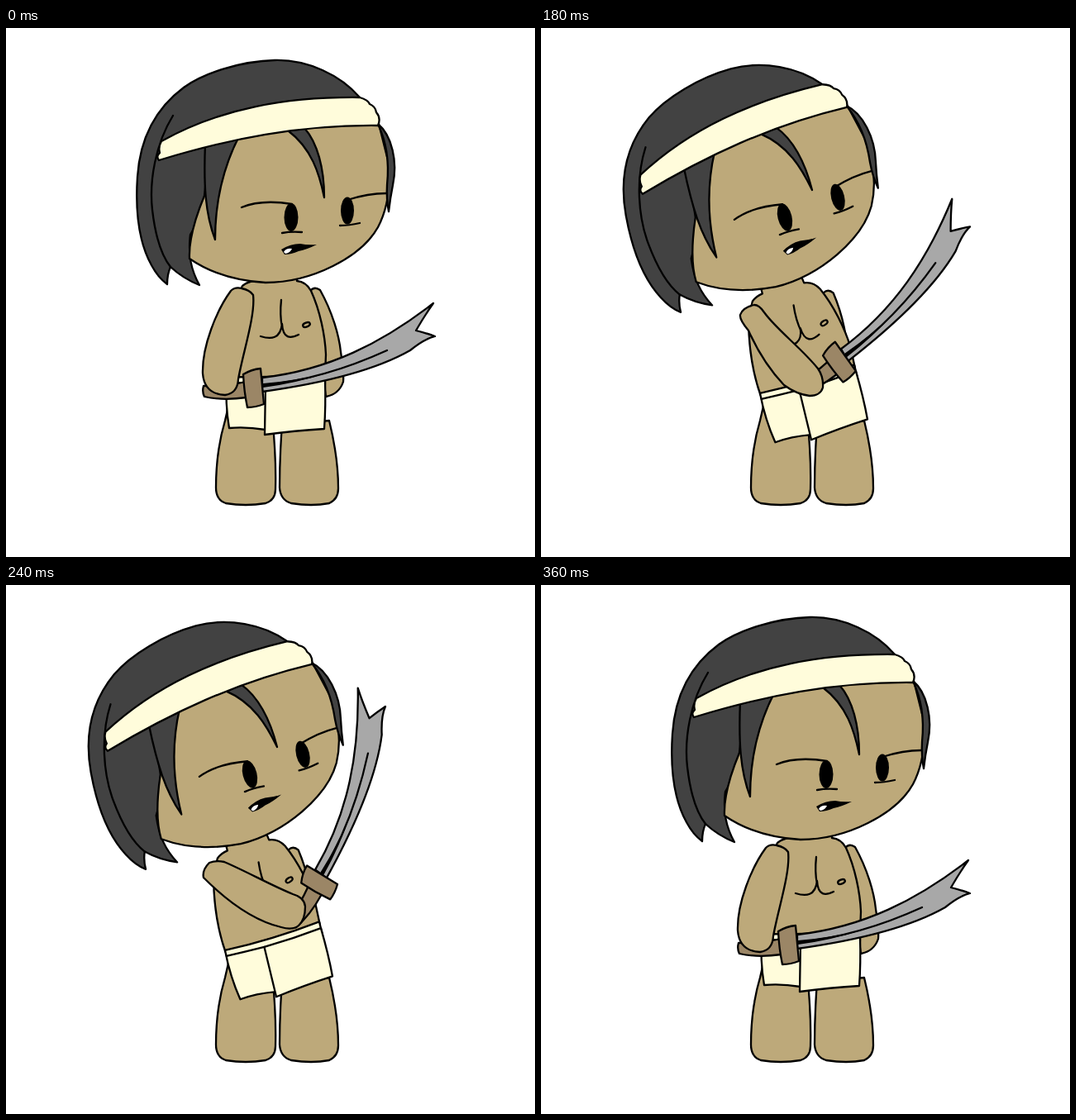
Recreate the animation shown at these times as an HTML page. Size 640x640 px, loop 0.42 s.

```html
<!DOCTYPE html>
<html>
<head>
<meta charset="utf-8">
<title>Sword idle</title>
<style>
html, body { margin: 0; height: 100%; overflow: hidden; background: #fff; }
svg { display: block; width: 100%; height: 100%; }
path, ellipse { stroke: #000; stroke-width: 2.3; stroke-linejoin: round; stroke-linecap: round; }
.skin { fill: #bda97a; }
.hair { fill: #424242; }
.cloth { fill: #fffcdb; }
.steel { fill: #a8a8a8; }
.wood { fill: #9b8666; }
.line { fill: none; }
.ink { fill: #000; stroke: none; }
.tooth { fill: #fff; stroke: none; }
#spikes path { stroke: none; }
</style>
</head>
<body>
<svg viewBox="0 0 640 640">
  <g id="legs" class="skin">
    <path d="M276 430Q270 452 265 475C257 502 254 530 254 556Q254 571 266 575Q290 579 314 575Q326 571 326 558Q327 525 323 480Z"/>
    <path d="M334 480Q331 520 331 556Q332 571 345 575Q370 579 391 575Q402 570 402 557Q402 520 391 475Z"/>
  </g>
  <g id="backArm">
    <path class="skin" d="M368 318Q373 312 380 317C395 344 403 372 405 392Q409 418 408 428Q403 443 387 446Z"/>
  </g>
  <g id="torso">
    <path class="skin" d="M267 424Q264 390 272 349Q278 325 286 312Q292 307 300 306L300 292L350 292L352 306Q363 307 369 318C380 342 386 372 387 395L386 420Z"/>
    <path class="line" d="M333 329Q331 347 334 362M308 373C321 377 332 376 334 358C335 376 344 376 354 371"/>
    <ellipse class="line" cx="363.500" cy="359" rx="4.500" ry="2.500" transform="rotate(-20 363.500 359)"/>
    <path class="cloth" d="M267 422Q325 424 386 417L386 430L383 480L314 486Q290 482 270 484Q265 455 267 422Z"/>
    <path class="cloth" d="M314 430Q350 429 386 425Q387 458 385 485Q350 487 313 492Z"/>
    <path class="line" d="M267 429Q290 430 314 430"/>
  </g>
  <g id="sword">
    <path class="wood" d="M239 433Q263 434 290 428L291 447Q262 451 240 446Q237 440 239 433Z"/>
    <path class="steel" d="M310 423C390 414 455 381 517 333Q507 347 496 366Q508 369 519 373Q506 376 489 390C445 415 375 431 310 440Z"/>
    <path class="line" d="M311 432C365 427 415 411 461 390"/>
    <path class="ink" d="M311 430Q350 427 390 417Q350 430 311 435Z"/>
    <path class="wood" d="M287 419Q297 413 308 412L312 455Q302 459 292 459Q288 440 287 419Z"/>
  </g>
  <path id="arm" class="skin"/>
  <g id="spikes" class="steel"></g>
  <g id="head">
    <path class="hair" d="M186 150L188 137L300 115L428 84C405 57 365 38 325 39C285 40 240 54 215 72C180 98 162 135 159 180C156 225 161 260 176 287Q184 302 195 310Q195 298 199 289Q214 303 234 311C224 293 220 275 223 250L290 132Z"/>
    <path class="skin" d="M240 203C228 232 221 258 222 279C248 297 280 306 314 308C370 308 430 277 450 241C462 218 466 193 462 160L450 112L290 124L245 150Z"/>
    <path class="hair" d="M241 140C239 190 241 225 253 256C253 215 261 172 282 131Z"/>
    <path class="hair" d="M341 124C370 146 379 176 385 205C385 170 377 139 361 121Z"/>
    <path class="hair" d="M450 116C467 130 474 162 468 190Q465 205 463 222Q460 207 461 190C464 160 460 138 450 116Z"/>
    <path class="line" d="M202 106C181 140 173 185 177 220C181 255 188 275 199 289"/>
    <path class="cloth" d="M188 137C260 97 340 83 428 84Q438 87 440 92Q447 95 448 102Q454 109 450 118C355 117 270 134 185 160Q181 155 186 151Q184 144 188 137Z"/>
    <path class="line" d="M285 217Q309 207 346 213M334 248Q345 246 358 247M413 208Q438 200 460 200M404 239Q415 239 428 236"/>
    <ellipse class="ink" cx="345" cy="229" rx="8.500" ry="17"/>
    <ellipse class="ink" cx="413" cy="221" rx="8" ry="16.500"/>
    <path class="ink" d="M333 268Q344 261 356 261Q365 263 376 262Q364 268 354 270Q345 274 337 274Z"/>
    <path class="tooth" d="M336 271Q339 266 346 267Q344 272 338 273Z"/>
  </g>
</svg>
<script>
const $ = id => document.getElementById(id);

// Point on each part that the placements below refer to
const pivots = { head: [345, 229], torso: [314, 492], backArm: [373, 315], sword: [299, 436] };

// Placement of each part: x, y, turn in degrees
const rest = {
  head: [345, 229, 0], torso: [314, 492, 0], backArm: [373, 315, 0], sword: [299, 436, 0],
  arm: "M272 318Q277 313 285 315Q295 317 299 323C302 348 286 395 281 425Q280 442 265 444Q240 443 238 418C237 385 255 341 272 318Z"
};
const lean = {
  head: [326, 227.5, -6], torso: [334, 495, -7], backArm: [373, 318, 9], sword: [317, 436, -9.3],
  arm: "M264 326Q267 321 275 321Q292 320 298 329C301 355 297 385 294 415Q294 434 292 446Q287 454 275 453Q258 450 252 429C246 403 250 365 264 326Z"
};
const bend = {
  head: [295, 229, -14], torso: [328, 498, -14.5], backArm: [347, 318, 6], sword: [360, 405, -30],
  arm: "M241 347Q244 338 258 335Q264 335 270 344C285 365 315 387 335 412Q342 422 341 435Q338 445 325 445Q309 443 294 432C276 413 262 391 251 366Q240 353 241 347Z"
};
const raise = {
  ...bend, sword: [378, 361, -53.3],
  arm: "M239 354Q237 345 246 336Q254 333 264 335C292 347 320 363 347 374Q361 378 362 389Q362 405 354 412Q347 418 333 414C299 406 268 383 239 354Z"
};
const slash = {
  ...lean, sword: [346, 416, -22.6], spikes: true,
  arm: "M264 328Q266 319 278 319Q288 319 294 325C309 350 314 382 322 411Q328 424 327 432Q320 445 306 446Q293 444 288 430C272 395 264 365 264 328Z"
};
const poses = [rest, lean, bend, raise, slash, rest];

// Each spike: tip x, y, then base x, y
const spikes = [[425, 291, 444, 324], [429, 320, 439, 332], [444, 293, 454, 315],
  [455, 262, 472, 298], [457, 287, 463, 305], [471, 262, 485, 285], [482, 260, 490, 278]];
$("spikes").innerHTML = spikes.map(([x, y, bx, by]) => {
  const mid = (y + by) / 2;
  return `<path d="M${x} ${y}Q${bx - 4} ${mid} ${bx + 3} ${by - 2}L${bx - 4} ${by + 3}Q${bx - 6} ${mid} ${x} ${y}Z"/>`;
}).join("");

function draw(now) {
  const t = now % 420;
  const pose = poses[t < 120 ? 0 : Math.floor(t / 60) - 1];
  for (const id in pivots) {
    const [x, y, turn] = pose[id], [px, py] = pivots[id];
    $(id).setAttribute("transform", `translate(${x} ${y}) rotate(${turn}) translate(${-px} ${-py})`);
  }
  $("arm").setAttribute("d", pose.arm);
  $("spikes").style.display = pose.spikes ? "" : "none";
}

const start = performance.now();
function tick() {
  draw(performance.now() - start);
  requestAnimationFrame(tick);
}
tick();
</script>
</body>
</html>
```
